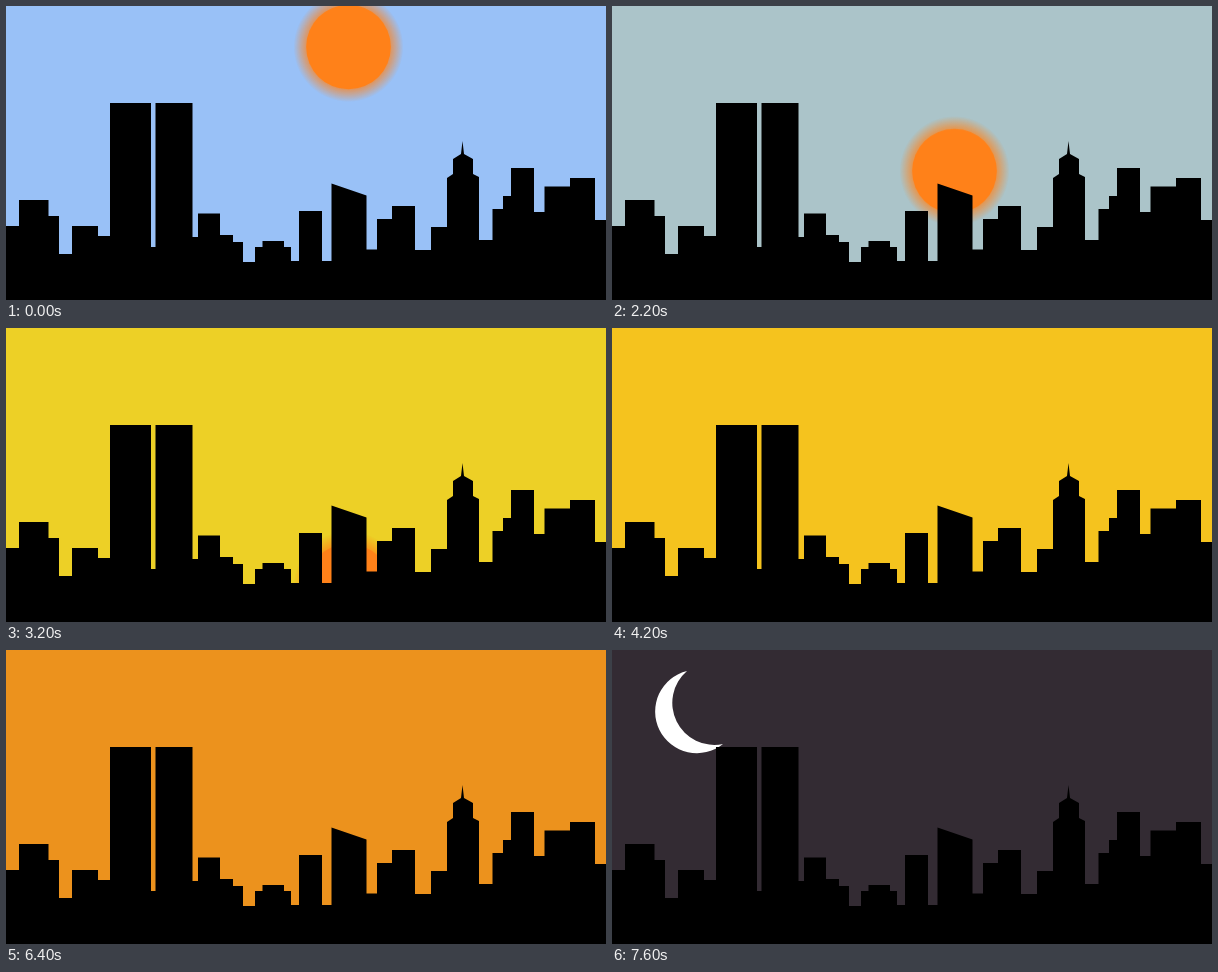
These frames come from a looping animation (600 px wide and 294 px high, 7700 ms). An HTML page:

```html
<!DOCTYPE html>
<html lang="en">
<head>
<meta charset="utf-8">
<title>City sunset</title>
<style>
  html, body { margin: 0; width: 100%; height: 100%; overflow: hidden; background: #000; }
  svg { display: block; width: 100vw; height: 100vh; }
  .sky, .sun, .moon { animation: 7.7s infinite; }
  .sky { animation-name: dusk; animation-timing-function: ease-in-out; }
  .sun { animation-name: set; }
  .moon { animation-name: rise; }

  @keyframes dusk {
    0%, 22.08% { fill: #99c1f7; }
    42.2% { fill: #edd026; }
    68.2%, 70.13% { fill: #ffb414; }
    82.6%, 84.42% { fill: #ec921d; }
    96.1%, 100% { fill: #332b33; }
  }
  @keyframes set {
    0% { transform: translateY(41px); animation-timing-function: cubic-bezier(.333, .075, .667, .557); }
    51.95%, 100% { transform: translateY(337px); }
  }
  @keyframes rise {
    0%, 84.42% { transform: translateY(235px); animation-timing-function: ease-out; }
    98.7%, 100% { transform: none; }
  }
</style>
</head>
<body>
<svg viewBox="0 0 600 294" preserveAspectRatio="none">
  <defs>
    <radialGradient id="glow">
      <stop offset=".76" stop-color="#ff8119" stop-opacity=".7"/>
      <stop offset=".88" stop-color="#ff8119" stop-opacity=".35"/>
      <stop offset="1" stop-color="#ff8119" stop-opacity="0"/>
    </radialGradient>
  </defs>
  <rect class="sky" width="600" height="294" fill="#99c1f7"/>
  <g class="sun">
    <circle cx="342.5" r="55" fill="url(#glow)"/>
    <circle cx="342.5" r="42.3" fill="#ff8119"/>
  </g>
  <path class="moon" fill="#fff" d="M75 21A41.7 41.7 0 1 0 111 94A42 42 0 0 1 75 21Z"/>
  <path d="M0 294V220H13V194H42.500V210H53V248H66V220H92V230H104V97H145V241H149.500V97H186.500V231H192V207.500H214V229H227V236H237V256H249V241H256.500V235H278V241H285V255H293V205H316V255H325.500V177.500L360.500 189.500V243.500H371V213H386V200H409V244H425V221H441V172L447 168V153L455 148L456.500 135L458 148L467 153V168L473 171V234H486.500V203H497V190H505V162H528V206H538.500V180.500H564V172H589V214H600V294Z"/>
</svg>
</body>
</html>
```
